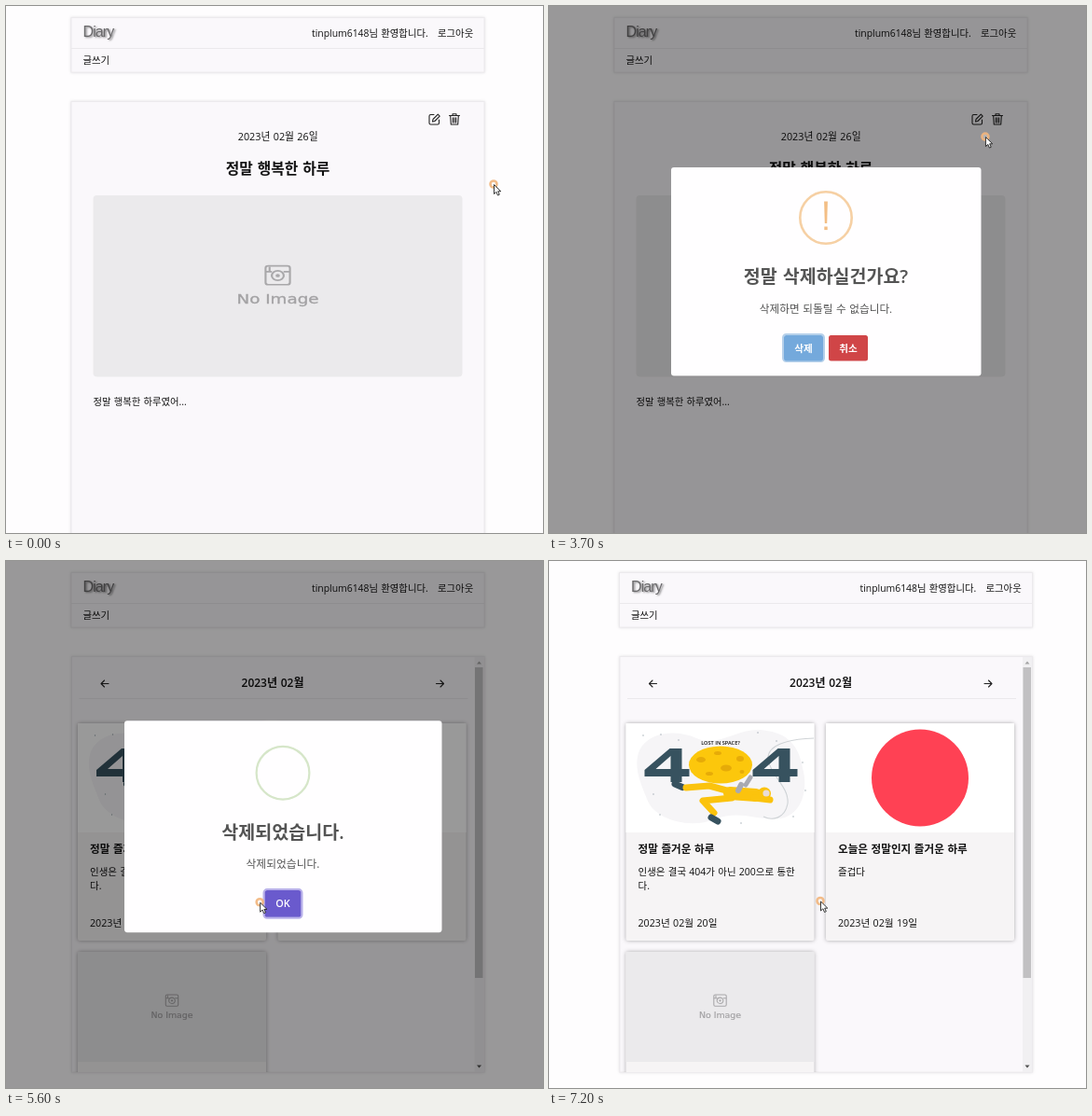
Recreate the animation shown at these times as an HTML page. Size 576x565 px, loop 7.3 s.

```html
<!DOCTYPE html>
<html lang="ko">
<head>
<meta charset="utf-8">
<title>Diary</title>
<style>
  html, body { margin: 0; width: 100%; height: 100%; overflow: hidden; background: #fefdfe; }
  svg { display: block; width: 100%; height: 100%; }
  text { font-family: "Open Sans", "Noto Sans CJK KR", "Noto Sans KR", sans-serif; word-spacing: .05em; fill: #111; }
  .logo { font-family: "Liberation Sans", Arial, sans-serif; fill: #6a696b; letter-spacing: -.055em;
          text-shadow: 1.5px 1px 2px #8a898b; }
  .card { fill: #faf8fb; stroke: #eceaed; filter: drop-shadow(0 0 1.5px rgba(0,0,0,.12)); }
  .tile { fill: #f6f4f5; filter: drop-shadow(0 0 2px rgba(0,0,0,.32)); }
  .line { fill: none; stroke: #222; stroke-width: 1.1; stroke-linecap: round; stroke-linejoin: round; }
  .empty { font-family: "DejaVu Sans", sans-serif; word-spacing: 0; fill: #a3a2a4; stroke: #a3a2a4; stroke-width: .2; }
  .rule { stroke: #ebe9ec; }
  .title { fill: #545454; }
  .label { fill: #fff; }
</style>
</head>
<body>
<svg id="stage" viewBox="0 0 576 565" preserveAspectRatio="none"></svg>
<script>
const LOOP = 7300, STEP = 100;
const PRESSES = [3000, 5000, 6400];
const SHIFT = 5.5;

// Text placed by its vertical centre.
const text = (x, y, size, str, attrs = '') =>
  `<text x="${x}" y="${y + size * .36}" font-size="${size}" ${attrs}>${str}</text>`;
const mid = (x, y, size, str, attrs = '') => text(x, y, size, str, 'text-anchor="middle" ' + attrs);
const rect = (x, y, w, h, attrs = '') => `<rect x="${x}" y="${y}" width="${w}" height="${h}" ${attrs}/>`;
const path = (d, attrs = 'class="line"') => `<path d="${d}" ${attrs}/>`;
const circle = (x, y, r, attrs) => `<circle cx="${x}" cy="${y}" r="${r}" ${attrs}/>`;
const ellipse = (x, y, rx, ry, attrs = '') => `<ellipse cx="${x}" cy="${y}" rx="${rx}" ry="${ry}" ${attrs}/>`;
const bold = 'font-weight="600"';

// "No Image" picture, scaled with its box.
const noImage = (x, y, sx, sy) => `
  <g transform="translate(${x} ${y}) scale(${sx} ${sy})">
    <g fill="none" stroke="#a9a8aa" stroke-width="1.1">
      ${rect(-6.7, -18, 13.4, 13, 'rx="1.5"')}
      ${path('M-6.700 -14H-3.200M3.200 -14H6.700M-4.500 -17.500V-14.500', '')}
      ${circle(0, -11.3, 3.3, '')}
    </g>
    ${circle(0, -11.3, 1.2, 'fill="#a9a8aa"')}
    ${mid(0, 4.8, 9.4, 'No Image', 'class="empty"')}
  </g>`;

const header = `
  ${rect(70, 12.5, 443, 58.5, 'class="card"')}
  ${path('M70 45.5H513', 'class="rule"')}
  ${text(82.5, 27.5, 16, 'Diary', 'class="logo"')}
  ${text(328, 29, 10.4, 'tinplum6148님 환영합니다.')}
  ${text(463, 29, 10.4, '로그아웃')}
  ${text(82.5, 58, 10.4, '글쓰기')}`;

const detail = `
  ${rect(70, 102.5, 443, 480, 'class="card"')}
  ${path('M459 116.5H455.5Q454 116.5 454 118V125.5Q454 127 455.5 127H463Q464.5 127 464.5 125.5V122M457.5 124L458 121.5L463.3 116.2L465.2 118.1L459.8 123.5Z')}
  ${path('M475.5 117.5H486.5M479 117.3V115.8H483V117.3M476.7 117.7L477.3 127H484.7L485.3 117.7M479.3 119.8V125M481 119.8V125M482.7 119.8V125')}
  ${mid(291.7, 140.5, 10.8, '2023년 02월 26일')}
  ${mid(291.5, 174, 15.8, '정말 행복한 하루', bold)}
  ${rect(93.5, 203, 396, 194.5, 'rx="4" fill="#ebeaec"')}
  ${noImage(291.5, 306.5, 1.95, 1.55)}
  ${text(93.5, 424, 10.35, '정말 행복한 하루였어...')}`;

const four = x => path(`M${x} 224L${x + 27} 201H${x + 40}V223H${x + 48}V231H${x + 40}V237H${x + 28}V231H${x}ZM${x + 12} 223H${x + 28}V209Z`,
  'fill="#37525f" fill-rule="evenodd"');
const limb = (d, w, color = '#fbc30d') =>
  path(d, `fill="none" stroke="${color}" stroke-width="${w}" stroke-linecap="round" stroke-linejoin="round"`);
const dots = [[101, 187], [120, 186], [139, 192], [224, 184], [244, 193], [272, 216], [112, 250], [119, 272], [206, 281], [262, 274], [275, 246]]
  .map(([x, y]) => circle(x, y, .7, 'fill="#9aa5ab"')).join('');

const space = `
  ${path('M97 203C108 182 138 181 158 190C182 200 200 180 226 181C256 183 268 198 272 222C279 246 270 273 248 276C222 279 205 266 178 277C148 288 112 276 105 255C98 238 90 220 97 203Z', 'fill="#f6f5f7"')}
  ${dots}
  ${path('M284 190C254 191 235 198 235 211C236 229 258 242 256 260C253 276 240 279 230 274', 'fill="none" stroke="#cfd3d6" stroke-width="1.1"')}
  ${four(102.5)}${four(218.5)}
  ${ellipse(184, 218.5, 34, 20, 'fill="#fcc70c"')}
  <g fill="#e6ab08">
    ${ellipse(163, 213, 5, 3)}${ellipse(190, 222, 6, 3.5)}${ellipse(181, 206, 4, 2)}
    ${ellipse(205, 212, 4, 3)}${ellipse(172, 228, 4, 2)}${ellipse(207, 226, 2.5, 2)}
  </g>
  ${limb('M135 239L143 242.5', 7, '#37525f')}
  ${limb('M147 243L172 241L194 247', 7)}
  ${limb('M177 270L165 257L196 254', 7)}
  ${limb('M174 275L181 279', 7, '#37525f')}
  ${limb('M194 249L222 251', 14)}
  ${limb('M220 254L237 256', 7)}
  ${limb('M203 246L206 240', 6, '#a8a9b1')}
  ${limb('M211 240L216 232', 5, '#a8a9b1')}
  ${circle(231, 249.5, 7, 'fill="#fbc30d"')}${circle(233, 249, 3.6, 'fill="#e9dcd7"')}
  ${mid(184, 195, 5.6, 'LOST IN SPACE?', 'font-weight="600" style="word-spacing:0"')}`;

const entry = (x, picture, title, lines, date) => `
  ${rect(x, 174, 202, 233, 'rx="2" class="tile"')}
  ${rect(x, 174, 202, 117, 'fill="#fff"')}
  ${picture}
  ${text(x + 13, 309, 11.6, title, bold)}
  ${lines.map((s, i) => text(x + 13, 333 + i * 15, 10.5, s)).join('')}
  ${text(x + 13, 388, 10.7, date)}`;

const list = `
  <g transform="translate(${-SHIFT})">
    ${rect(76, 102.5, 442.5, 445.5, 'class="card"')}
    ${path('M115.5 131.5H107.5M111 128L107.5 131.5L111 135')}
    ${path('M467 131.5H475M471.5 128L475 131.5L471.5 135')}
    ${mid(291.5, 130.5, 12, '2023년 02월', bold)}
    ${path('M84 147.5H501', 'class="rule"')}
    ${entry(82.5, space, '정말 즐거운 하루', ['인생은 결국 404가 아닌 200으로 통한', '다.'], '2023년 02월 20일')}
    ${entry(297, circle(398, 232.5, 52, 'fill="#ff4154"'), '오늘은 정말인지 즐거운 하루', ['즐겁다'], '2023년 02월 19일')}
    <g clip-path="url(#scroll)">
      ${rect(82.5, 419, 202, 233, 'rx="2" class="tile"')}
      ${rect(82.5, 419, 202, 118, 'fill="#ebeaec"')}
      ${noImage(183.5, 482, 1, .95)}
    </g>
    ${rect(508, 103, 10, 445, 'fill="#f1f0f2"')}
    ${rect(508.5, 114, 8.5, 333, 'fill="#c1c0c2"')}
    ${path('M510.5 110.5H515.5L513 107.5Z', 'fill="#a3a3a3"')}
    ${path('M510.5 540.5H515.5L513 543.5Z', 'fill="#505050"')}
  </g>`;

const button = (x, y, w, h, color, label, id = '') =>
  rect(x, y, w, h, `rx="2.5" fill="${color}" ${id}`) +
  mid(x + w / 2, y + h / 2, 10.6, label, 'class="label" ' + bold);
const focus = (x, y, w, h, color) => rect(x, y, w, h, `rx="3.5" fill="none" stroke="${color}" stroke-width="2"`);

const confirmBox = `
  ${rect(131, 173, 332.5, 223.5, 'rx="3" fill="#fffeff"')}
  <g id="warn">
    ${circle(0, 0, 27.7, 'fill="none" stroke="#f6d0a4" stroke-width="2.6"')}
    <g id="mark" fill="#f3be85">
      ${path('M-1.900 -17.500H1.900L1.200 6H-1.200Z', '')}
      ${rect(-1.7, 9.5, 3.4, 3.6, '')}
    </g>
  </g>
  ${mid(297, 290, 19.5, '정말 삭제하실건가요?', 'class="title" ' + bold)}
  ${mid(297, 325, 11.65, '삭제하면 되돌릴 수 없습니다.', 'class="title"')}
  ${focus(251, 352, 44, 29, '#b5d0ea')}
  ${button(252, 353, 42, 27.5, '#74a9dc', '삭제', 'id="remove"')}
  ${button(300, 353, 42, 27.5, '#d04547', '취소')}`;

const doneBox = `
  ${rect(131, 174, 332.5, 221.5, 'rx="3" fill="#fffeff"')}
  ${circle(297, 228.5, 27.7, 'fill="none" stroke="#d6e6c9" stroke-width="2.2"')}
  ${path('M282.5 230L291 239L312.5 218.5', 'id="check" pathLength="1" fill="none" stroke="#a9cf90" stroke-width="3" stroke-linecap="round"')}
  ${mid(297, 291, 19.1, '삭제되었습니다.', 'class="title" ' + bold)}
  ${mid(297, 324, 11.5, '삭제되었습니다.', 'class="title"')}
  ${focus(277, 350.5, 40, 30, '#b9b1ea')}
  ${button(278, 351.5, 38, 28, '#6a5acd', 'OK', 'id="ok"')}`;

const outline = 'fill="#fff" stroke="#222" stroke-width=".9" stroke-linejoin="round"';
const pointer = `
  <g id="cursor">
    <circle id="ring" fill="rgba(255,255,255,.3)"/>
    ${path('M.5 .5V10.5L2.9 8.3L4.5 12L6.3 11.2L4.7 7.7H7.8Z', 'id="arrow" ' + outline)}
    ${path('M-.8 1Q.3 -.3 1.4 1V5.5Q2.7 4.7 3.5 5.9Q4.8 5.2 5.4 6.4Q7 6 7.2 7.6V10.5Q7 12.5 5.8 14.5H.3Q-1 12.5 -3.2 9.4Q-3.6 7.6 -1.9 7.9L-.8 9Z', 'id="hand" ' + outline)}
  </g>`;

stage.innerHTML = `
  <defs><clipPath id="scroll">${rect(70, 103, 450, 445)}</clipPath></defs>
  <g id="page">${header}<g id="detail">${detail}</g><g id="list">${list}</g></g>
  ${rect(0, 0, 576, 565, 'id="shade"')}
  <g id="confirm">${confirmBox}</g>
  <g id="done">${doneBox}</g>
  ${pointer}`;

const $ = id => document.getElementById(id);
const set = (id, attrs) => { for (const k in attrs) $(id).setAttribute(k, attrs[k]); };
const show = (id, on) => set(id, { visibility: on ? 'visible' : 'hidden' });
const clamp = v => Math.max(0, Math.min(1, v));
const smooth = v => v * v * (3 - 2 * v);

// Piecewise linear value of [position, value] pairs.
function track(keys, p) {
  if (p <= keys[0][0]) return keys[0][1];
  for (let i = 1; i < keys.length; i++) {
    const [a, u] = keys[i - 1], [b, v] = keys[i];
    if (p <= b) return u + (v - u) * (p - a) / (b - a);
  }
  return keys[keys.length - 1][1];
}

const POP = [[0, .7], [.45, 1.05], [.8, .95], [1, 1]];
const TILT = [[0, 45], [.25, -25], [.5, 15], [.75, -5], [1, 0]];
const MOVES = [ // start, end, from, to
  [2000, 2800, [523, 191], [484, 122]],
  [3500, 4700, [484, 122], [267, 366]],
  [5300, 6200, [267, 366], [287, 365]],
  [6700, 6800, [287, 365], [286, 364]],
  [7100, 7200, [286, 364], [291, 364.5]]
];

function cursorAt(t) {
  let at = MOVES[0][2];
  for (const [a, b, from, to] of MOVES) {
    if (t < a) break;
    const p = smooth(clamp((t - a) / (b - a)));
    at = from.map((v, i) => v + (to[i] - v) * p);
  }
  return at;
}

// Pops a dialog in and out; returns how dark the backdrop is.
function dialog(id, t, open, close, cy) {
  const on = t >= open && t < close + 150;
  show(id, on);
  if (!on) return 0;
  const out = clamp((t - close) / 150);
  const scale = track(POP, (t - open) / 300) * (1 - .5 * out);
  set(id, {
    transform: `translate(297 ${cy}) scale(${scale}) translate(-297 ${-cy})`,
    opacity: 1 - out
  });
  return .4 * (1 - (1 - clamp((t - open) / 100)) ** 3) * (1 - clamp((t - close) / 100));
}

function draw(t) {
  const removed = t >= 5475;
  $('detail').style.display = removed ? 'none' : '';
  $('list').style.display = removed ? '' : 'none';
  set('page', { transform: `translate(${t >= 6700 ? SHIFT : 0})` });

  const dark = dialog('confirm', t, 3175, 5150, 284.7) + dialog('done', t, 5475, 6550, 284.7);
  set('shade', { 'fill-opacity': dark });

  const p = clamp((t - 3175) / 500);
  const flip = Math.cos((1 - p) * 100 * Math.PI / 180);
  set('warn', { transform: `translate(297 227) scale(1 ${Math.max(flip, .001)})`, opacity: flip > 0 ? p : 0 });
  set('mark', { transform: `rotate(${track(TILT, p)})`, opacity: clamp(p * 1.6) });

  const tick = clamp((t - 5875) / 300);
  set('check', { 'stroke-dasharray': `${tick} 2`, opacity: tick > 0 ? 1 : 0 });

  const [x, y] = cursorAt(t);
  const inside = (l, r, top, bottom) => x > l && x < r && y > top && y < bottom;
  const onRemove = t > 3500 && t < 5200 && inside(252, 294, 353, 380);
  const onOk = t > 5700 && t < 6600 && inside(278, 316, 351, 380);
  const hover = onRemove || onOk;
  set('remove', { fill: onRemove ? '#5c89b4' : '#74a9dc' });
  set('ok', { fill: onOk ? '#6456c4' : '#6a5acd' });
  set('cursor', { transform: `translate(${x} ${y})` });
  show('hand', hover);
  show('arrow', !hover);

  const press = PRESSES.find(v => t >= v && t < v + 400);
  const k = press === undefined ? 0 : (t - press) / 100;
  set('ring', {
    cx: hover ? -4 : 0,
    r: 3.5 + 1.2 * k,
    stroke: press === undefined ? '#f2b57c' : '#6caee4',
    'stroke-width': press === undefined ? 2.6 : 2 + k,
    'stroke-opacity': .9
  });
}

function frame(now) {
  draw(Math.floor(now % LOOP / STEP) * STEP);
  requestAnimationFrame(frame);
}
draw(0);
requestAnimationFrame(frame);
</script>
</body>
</html>
```
